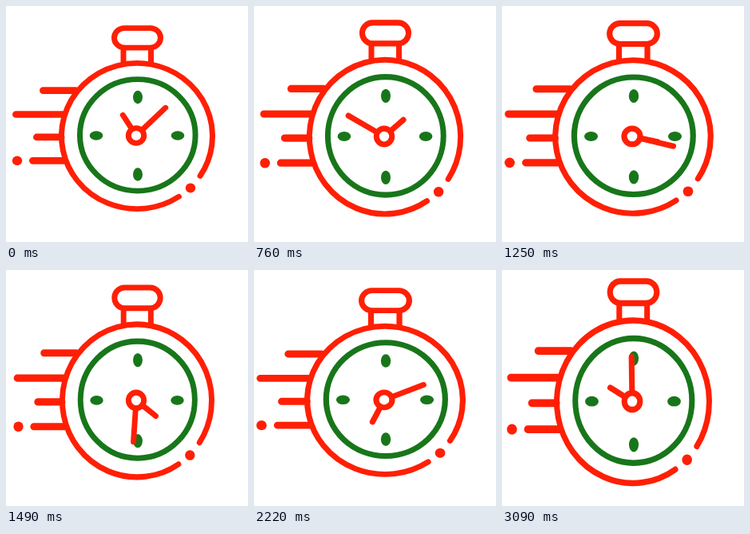
An HTML page that plays this animation: 303x295 px, repeating every 3.12 s.

```html
<!DOCTYPE html>
<html lang="en">
<head>
<meta charset="utf-8">
<title>Stopwatch</title>
<style>
  html, body { margin: 0; width: 100%; height: 100%; overflow: hidden; background: #fff; }
  svg { display: block; width: 303px; height: 295px; }
  .red { fill: none; stroke: #ff1f05; stroke-width: 7; stroke-linecap: round; }
  .speed { stroke-width: 9; }
  .dot { fill: #ff1f05; }
  .ring { fill: none; stroke: #18761a; stroke-width: 7; }
  .mark { fill: #18761a; }
</style>
</head>
<body>
<svg viewBox="0 0 303 295">
  <g id="watch">
    <path class="red speed" d="M-117.5-59H-77M-151.5-28H-92M-125.5 1.5H-95M-130.5 32H-91"/>
    <circle class="dot" cx="-150" cy="32" r="6.2"/>
    <rect class="red" x="-28.5" y="-140" width="58" height="25.5" rx="12.75"/>
    <path class="red" d="M-17-112V-96M17.5-112V-96"/>
    <path class="red" id="rim"/>
    <circle class="dot" cx="67" cy="67.4" r="6.2"/>
    <circle class="ring" cx=".8" cy="-1.2" r="72.3"/>
    <g class="mark">
      <ellipse cx="1" cy="-50.3" rx="6" ry="8.5"/>
      <ellipse cx="1" cy="49.8" rx="6" ry="8.5"/>
      <ellipse cx="-51" cy="-.5" rx="8.3" ry="5.9"/>
      <ellipse cx="51" cy="-.5" rx="8.3" ry="5.9"/>
    </g>
    <g transform="translate(-1 -.5)">
      <path class="red" id="long" d="M0-10V-51.5"/>
      <path class="red" id="short" d="M0-10V-31.5"/>
      <circle class="red" r="9.7" style="fill:#fff"/>
    </g>
  </g>
</svg>
<script>
const LOOP = 3120;
const $ = id => document.getElementById(id);

// Start time of each pose: 70 ms apart, with a few longer holds
const holds = [0, 8, 18, 28, 38];
const starts = [0];
for (let i = 0; i < 42; i++) starts.push(starts[i] + (holds.includes(i) ? 100 : 70));

// Rim radii over time, as [ms, px]
const radiusX = [[0, 98], [450, 95], [1040, 101], [1180, 102], [1490, 97],
                 [2220, 101], [2640, 101], [3090, 99]];
const radiusY = [[0, 94.5], [450, 99], [700, 100], [1040, 99.5], [1490, 99],
                 [1850, 99.5], [2220, 96], [2360, 100], [2640, 105.5], [3090, 105.5]];

function at(keys, t) {
  const i = Math.max(1, keys.findIndex(k => k[0] >= t));
  const [t0, a] = keys[i - 1], [t1, b] = keys[i];
  return a + (b - a) * (t - t0) / (t1 - t0);
}

function polar(r, deg) {
  const a = deg * Math.PI / 180;
  return `${r * Math.cos(a)} ${r * Math.sin(a)}`;
}
$('rim').setAttribute('d', `M${polar(94.5, 56.3)}A94.5 94.5 0 1 1 ${polar(94.5, 33.2)}`);

const turn = (id, deg) => $(id).setAttribute('transform', `rotate(${deg})`);

function draw(ms) {
  const t = starts.filter(s => s <= ms).pop();
  const rx = at(radiusX, t), ry = at(radiusY, t);
  const cy = 162.5 + (ry - 94.5) * 0.2;
  $('watch').setAttribute('transform', `translate(164 ${cy}) scale(${rx / 98} ${ry / 98})`);
  turn('long', 45.5 + 0.3345 * t);
  turn('short', 328 + 0.1075 * t);
}

const begin = performance.now();
function tick() {
  draw((performance.now() - begin) % LOOP);
  requestAnimationFrame(tick);
}
tick();
</script>
</body>
</html>
```
